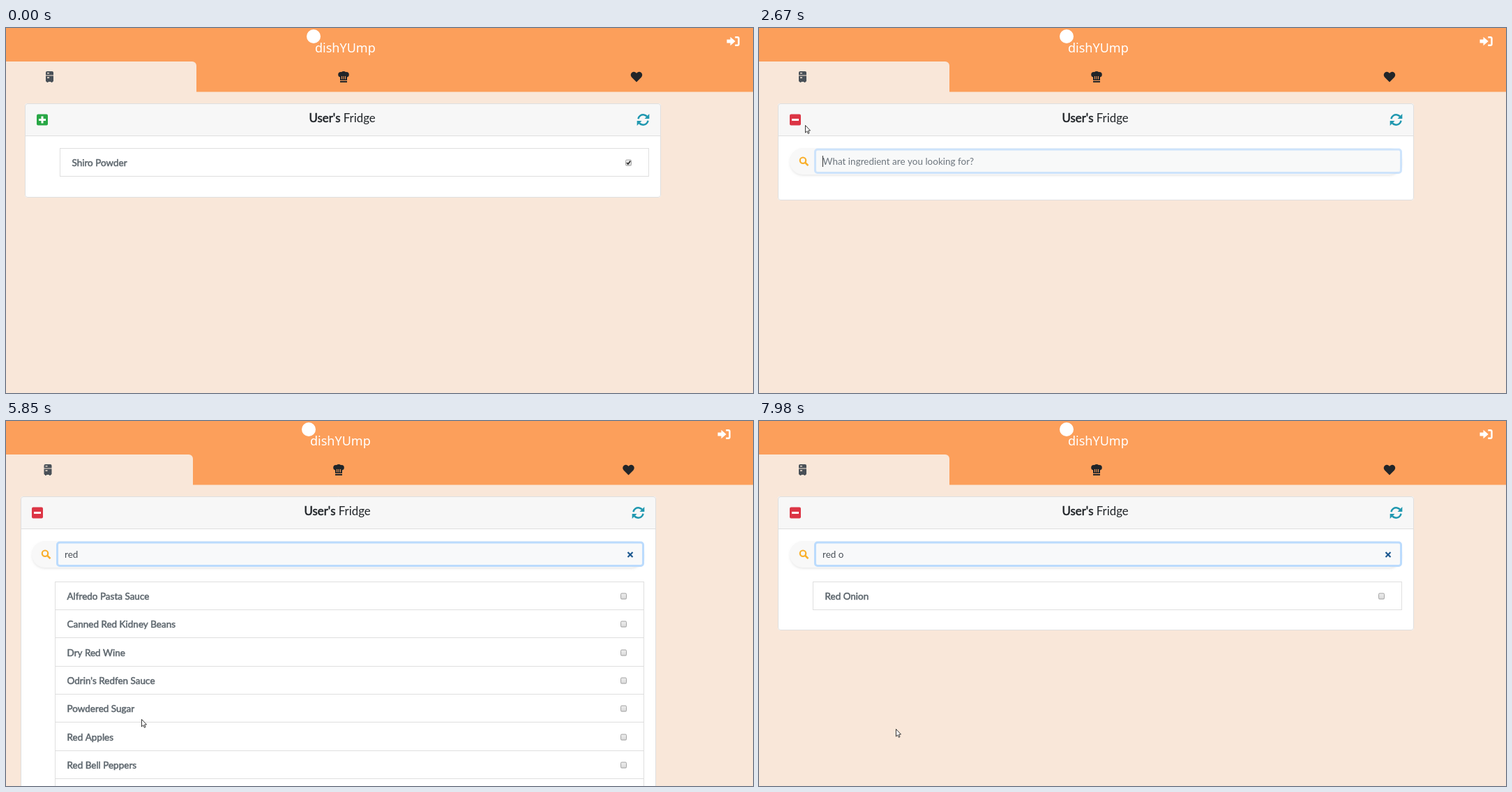
Animation of 1071 by 523 pixels, one loop 8 s. Source, as an HTML page with a canvas:

```html
<!DOCTYPE html>
<html lang="en">
<head>
<meta charset="utf-8">
<title>Fridge search</title>
<style>
html, body { margin: 0; width: 100%; height: 100%; overflow: hidden; background: #f9e7d9; }
canvas { display: block; }
</style>
</head>
<body>
<canvas id="stage" width="1071" height="523"></canvas>
<script>
const ctx = document.getElementById('stage').getContext('2d');
const LOOP = 8000;
const W = 1071, H = 523;
const ORANGE = '#fc9f5b', PAPER = '#f9e7d9', DARK = '#212529', GRAY = '#5f686f';
const BODY = '13.5px Lato, sans-serif';
const HEAD = '16.875px Lato, sans-serif';
const ROW = 40.3;
const CLICK = 2360, OPEN = 2610;

const redItems = ['Canned Red Kidney Beans', 'Dry Red Wine', 'Powdered Sugar', 'Red Apples',
  'Red Bell Peppers', 'Red Cabbage', 'Red Chilli'];
const reItems = ['Alfredo Pasta Sauce', 'Amaretto', 'Apple Butter Spread', 'Apricot Preserves',
  'Boneless Skinless Chicken Breast', 'Bread', 'Bread Flour'];
const mixedItems = ['Alfredo Pasta Sauce', ...redItems.slice(0, 2), "Odrin's Redfen Sauce",
  ...redItems.slice(2, 5)];

// Search states: start time, typed text, results
const states = [
  { at: OPEN, text: '', items: [] },
  { at: 4530, text: 're', items: reItems },
  { at: 5080, text: 'red', items: mixedItems },
  { at: 7190, text: 'red ', items: redItems },
  { at: 7420, text: 'red o', items: ['Red Onion'] }
];

// Pointer moves: start, end, steps, target x, target y
const moves = [
  [70, 190, 3, 679, 440],
  [430, 660, 4, 242, 352],
  [890, 1440, 8, 72, 163],
  [1810, 1990, 3, 54, 130],
  [OPEN, 3060, 7, 136, 190],
  [5470, 5850, 6, 194, 427],
  [6110, 6330, 4, 196, 441]
];

function rect(x, y, w, h, color) {
  ctx.fillStyle = color;
  ctx.fillRect(x, y, w, h);
}

function round(x, y, w, h, r, color) {
  ctx.beginPath();
  ctx.roundRect(x, y, w, h, r);
  ctx.fillStyle = color;
  ctx.fill();
}

function frame(x, y, w, h, r, color, width = 1) {
  ctx.beginPath();
  ctx.roundRect(x, y, w, h, r);
  ctx.strokeStyle = color;
  ctx.lineWidth = width;
  ctx.stroke();
}

function circle(x, y, r, color) {
  ctx.beginPath();
  ctx.arc(x, y, r, 0, Math.PI * 2);
  ctx.fillStyle = color;
  ctx.fill();
}

function ring(x, y, r, color, width) {
  ctx.beginPath();
  ctx.arc(x, y, r, 0, Math.PI * 2);
  ctx.strokeStyle = color;
  ctx.lineWidth = width;
  ctx.stroke();
}

function line(x1, y1, x2, y2, color, width) {
  ctx.beginPath();
  ctx.moveTo(x1, y1);
  ctx.lineTo(x2, y2);
  ctx.strokeStyle = color;
  ctx.lineWidth = width;
  ctx.stroke();
}

function poly(points) {
  ctx.beginPath();
  points.forEach(([x, y]) => ctx.lineTo(x, y));
  ctx.closePath();
}

function text(str, x, y, font, color, bold) {
  ctx.font = font;
  ctx.fillStyle = color;
  ctx.fillText(str, x, y);
  if (bold) {
    ctx.strokeStyle = color;
    ctx.lineWidth = 0.55;
    ctx.strokeText(str, x, y);
  }
  return ctx.measureText(str).width;
}

function at(x, y, draw) {
  ctx.save();
  ctx.translate(x, y);
  draw();
  ctx.restore();
}

function brand() {
  circle(11, 12, 10, '#fff');
  let size = 26;
  const font = () => `extra-condensed 500 ${size}px "Noto Sans", "Open Sans", Roboto, sans-serif`;
  ctx.font = font();
  while (size > 12 && ctx.measureText('dishYUmp').width > 87) {
    size -= 0.5;
    ctx.font = font();
  }
  text('dishYUmp', 13, 35, font(), '#fff');
}

function fridge() {
  const c = '#495057';
  round(-5.5, -8, 11, 5.6, [2, 2, 0, 0], c);
  round(-5.5, -1.6, 11, 8.6, [0, 0, 1.5, 1.5], c);
  rect(-4, 6, 2, 2, c);
  rect(2, 6, 2, 2, c);
  rect(-3.5, -6, 3, 1.3, PAPER);
  rect(-3.5, 0.4, 3, 1.5, PAPER);
}

function hat() {
  circle(-4, -3.3, 3.8, DARK);
  circle(0, -4.3, 3.8, DARK);
  circle(4, -3.3, 3.8, DARK);
  rect(-5, -3, 10, 8, DARK);
  for (const x of [-2.5, 0, 2.5]) rect(x - 0.5, -1, 1, 4.5, ORANGE);
  rect(-5, 6, 10, 2, DARK);
}

function heart() {
  ctx.beginPath();
  ctx.moveTo(0, 7.5);
  ctx.lineTo(-7, 0.4);
  ctx.bezierCurveTo(-10, -3, -7, -7.2, -4, -7.2);
  ctx.bezierCurveTo(-2, -7.2, -1, -6.2, 0, -5);
  ctx.bezierCurveTo(1, -6.2, 2, -7.2, 4, -7.2);
  ctx.bezierCurveTo(7, -7.2, 10, -3, 7, 0.4);
  ctx.closePath();
  ctx.fillStyle = DARK;
  ctx.fill();
}

function login() {
  poly([[-9, -2.5], [-4, -2.5], [-4, -6.3], [3.2, 0], [-4, 6.3], [-4, 2.5], [-9, 2.5]]);
  ctx.fillStyle = '#fff';
  ctx.fill();
  ctx.beginPath();
  ctx.moveTo(2.8, -5.8);
  ctx.lineTo(6.2, -5.8);
  ctx.quadraticCurveTo(8, -5.8, 8, -4);
  ctx.lineTo(8, 4);
  ctx.quadraticCurveTo(8, 5.8, 6.2, 5.8);
  ctx.lineTo(2.8, 5.8);
  ctx.strokeStyle = '#fff';
  ctx.lineWidth = 2.4;
  ctx.stroke();
}

function refresh() {
  const c = '#2098b0';
  for (let i = 0; i < 2; i++) {
    ctx.beginPath();
    ctx.arc(0, 0, 7.2, Math.PI * 1.06, Math.PI * 1.78);
    ctx.strokeStyle = c;
    ctx.lineWidth = 2.5;
    ctx.stroke();
    poly([[8.8, -8.4], [8.8, -1.6], [2, -1.6]]);
    ctx.fillStyle = c;
    ctx.fill();
    ctx.rotate(Math.PI);
  }
}

function toggle(open) {
  round(-8, -8, 16, 16, 2, open ? '#dc3545' : '#28a745');
  rect(-5, -1.5, 10, 3, '#fff');
  if (!open) rect(-1.5, -5, 3, 10, '#fff');
}

function checkbox(x, y, checked) {
  const g = ctx.createLinearGradient(0, y - 4, 0, y + 4);
  g.addColorStop(0, '#eeeeee');
  g.addColorStop(1, '#d9d9d9');
  round(x - 4.5, y - 4.5, 9, 9, 1.5, g);
  frame(x - 4, y - 4, 8, 8, 1.5, '#a6a6a6');
  if (checked) {
    ctx.beginPath();
    ctx.moveTo(x - 2.5, y);
    ctx.lineTo(x - 0.7, y + 2);
    ctx.lineTo(x + 2.8, y - 2.6);
    ctx.strokeStyle = '#2b2b2b';
    ctx.lineWidth = 1.7;
    ctx.stroke();
  }
}

function list(items, top, dx, checked) {
  const left = 78 + dx, right = 922 + dx;
  const rows = items.length > 1 ? items.length + 1 : 1;
  const bottom = Math.round(top + rows * ROW);
  for (let i = 0; i <= rows; i++) {
    rect(left - 1, Math.round(top + i * ROW - 0.2), right - left + 1, 1, '#dfdfdf');
  }
  rect(left - 1, top, 1, bottom - top, '#dfdfdf');
  rect(right - 1, top, 1, bottom - top, '#dfdfdf');
  items.forEach((name, i) => {
    const y = Math.round(top + i * ROW);
    text(name, 94.5 + dx, y + 25.5, BODY, GRAY, true);
    checkbox(892.5 + dx, y + 21, checked);
  });
}

function search(state, t, dx) {
  ctx.save();
  ctx.shadowColor = 'rgba(0,0,0,.075)';
  ctx.shadowBlur = 3;
  ctx.shadowOffsetY = 2;
  round(44 + dx, 172, 878, 38, 19, '#f8f8f8');
  ctx.restore();

  ring(63 + dx, 189.7, 4.2, '#f9af2b', 2.2);
  line(66 + dx, 192.7, 70.5 + dx, 197.2, '#f9af2b', 2.6);

  ctx.globalAlpha = Math.min(1, 0.3 + (t - OPEN) / 150);
  round(80.5 + dx, 174, 840, 33.5, 3, '#f8f9fa');
  frame(80.5 + dx, 174, 840, 33.5, 3.5, '#bbdbfd', 3);
  ctx.globalAlpha = 1;

  const x = 91 + dx;
  if (state.text) {
    text(state.text, x, 196, BODY, '#495057');
    line(898.5 + dx, 188, 905.5 + dx, 195, '#1c588f', 2.2);
    line(905.5 + dx, 188, 898.5 + dx, 195, '#1c588f', 2.2);
  } else {
    text('What ingredient are you looking for?', x + 0.5, 196, BODY, '#6c757d');
  }

  const age = t - state.at;
  const held = !state.text && t >= 3680;
  if (held || Math.floor(age / 531) % 2 === 0) {
    ctx.font = BODY;
    rect(Math.floor(x + ctx.measureText(state.text).width), 183, 1, 16, '#333');
  }
}

function arrow() {
  poly([[0.5, 0.5], [0.5, 11], [2.8, 8.8], [4.4, 12.3], [6, 11.6], [4.5, 8.2], [7.5, 8]]);
  ctx.fillStyle = '#fff';
  ctx.fill();
  ctx.strokeStyle = '#222';
  ctx.lineWidth = 0.9;
  ctx.stroke();
}

function beam() {
  rect(0, -5, 1, 10, '#222');
  for (const y of [-6, 5]) {
    rect(-2, y, 2, 1, '#222');
    rect(1, y, 2, 1, '#222');
  }
}

function pointer(t) {
  let x = 884.5, y = 537.5;
  if (t < moves[0][0]) return;
  for (const [start, end, steps, tx, ty] of moves) {
    if (t < start) break;
    const step = (end - start) / (steps - 1);
    const k = Math.min(1, (Math.floor((t - start) / step + 0.001) + 1) / steps);
    x += (tx - x) * k;
    y += (ty - y) * k;
  }
  x = Math.round(x);
  y = Math.round(y);
  const inField = t >= OPEN && x > 81 && y > 173 && y < 209;
  at(x, y, inField ? beam : arrow);
  if (t >= CLICK && t < OPEN) {
    ring(x + 1, y, 9.5, '#000', 1);
    ring(x + 1, y, 8.5, '#fff', 1);
  }
}

function draw(t) {
  const state = states.filter(s => t >= s.at).pop();
  const long = !!state && state.items.length > 1;
  const dx = long ? -7 : 0;

  rect(0, 0, W, H, PAPER);
  rect(0, 0, W, 91.5, ORANGE);
  round(0, 48, long ? 268 : 273, 44, [0, 6, 0, 0], PAPER);
  at(430 + dx, 0, brand);
  at(long ? 60 : 62.5, 70, fridge);
  at(484 + dx, 70, hat);
  at(long ? 892.5 : 904, 70, heart);
  at(long ? 1029.5 : 1042.5, 19, login);

  const left = long ? 21 : 27, right = 939 + dx;
  let bottom = 243;
  if (state) bottom = long ? H + 20 : state.items.length ? 300 : 247;
  round(left, 108, right - left, bottom - 108, 4, '#fff');
  round(left, 108, right - left, 47, [4, 4, 0, 0], '#f7f7f7');
  rect(left, 154, right - left, 1, '#dfdfdf');
  frame(left + 0.5, 108.5, right - left - 1, bottom - 109, 3.5, '#dfdfdf');

  at(52 + dx, 131.5, () => toggle(!!state));
  const w = text("User's ", 434.5 + dx, 135, HEAD, DARK, true);
  text('Fridge', 434.5 + dx + w, 135, HEAD, DARK);
  at(913.5 + dx, 131.5, refresh);

  if (!state) {
    list(['Shiro Powder'], 172, 0, true);
  } else {
    search(state, t, dx);
    if (state.items.length) list(state.items, 230, dx, false);
  }
  pointer(t);
}

const start = performance.now();
function tick() {
  draw((performance.now() - start) % LOOP);
  requestAnimationFrame(tick);
}
tick();
</script>
</body>
</html>
```
